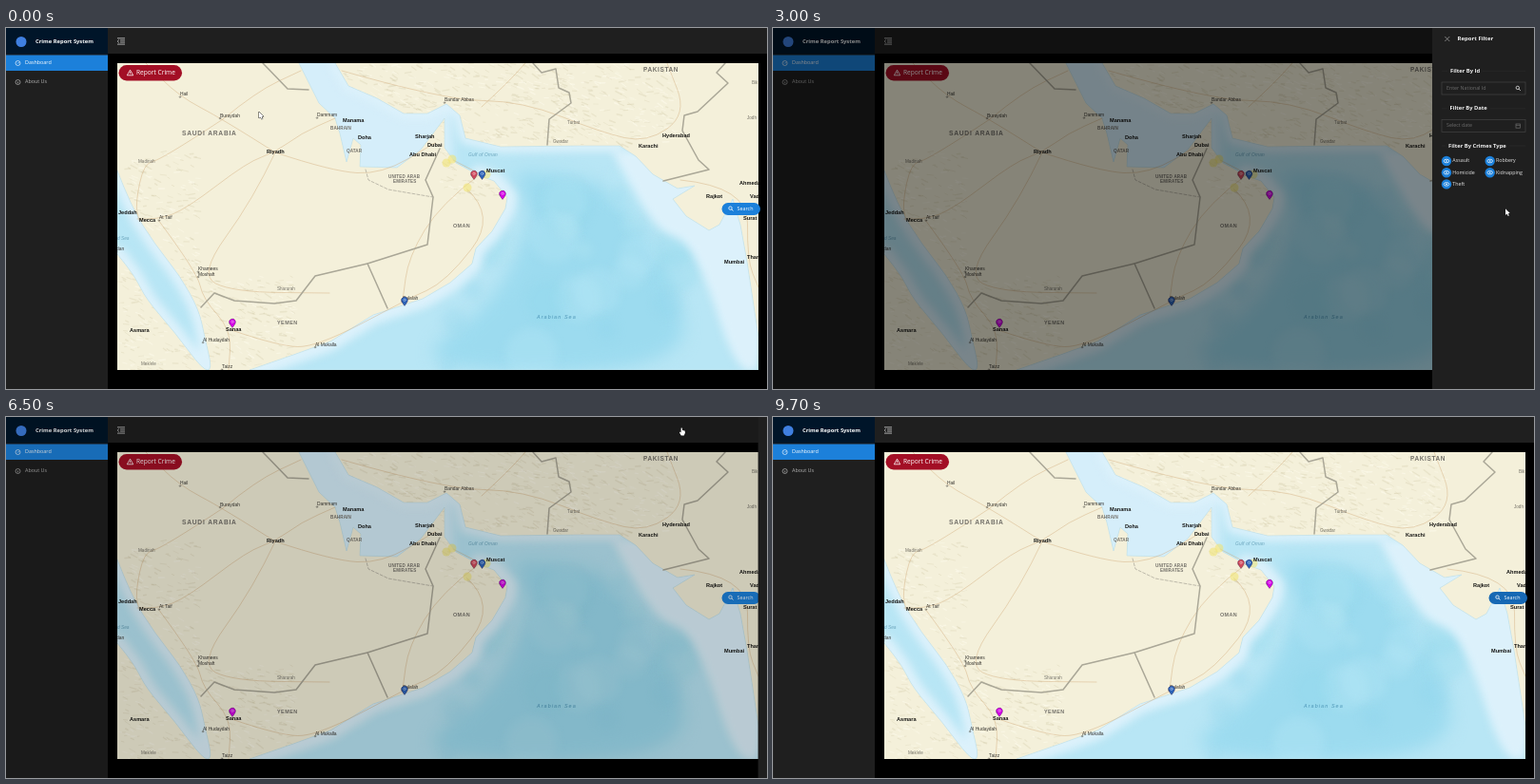
Recreate the animation shown at these times as an HTML page with a canvas. Size 800 px wide and 380 px high, loop 9.8 s.

```html
<!DOCTYPE html>
<html lang="en">
<head>
<meta charset="utf-8">
<title>Crime Report System</title>
<style>
  html, body { margin: 0; width: 100%; height: 100%; overflow: hidden; background: #000; }
  canvas { display: block; width: 800px; height: 380px; }
</style>
</head>
<body>
<canvas id="stage" width="800" height="380"></canvas>
<script>
const W = 800, H = 380, LOOP = 9800;
const MAP = { x: 117, y: 37, w: 674, h: 323 };
const DRAWER_W = 107, SLIDE = 300, MASK = 0.45;
const UI = '"Open Sans", "Noto Sans", sans-serif';
const SANS = '"Liberation Sans", Arial, sans-serif';
const ctx = document.getElementById('stage').getContext('2d');

// ---------- helpers ----------
function seeded(seed) {
  return () => (seed = (seed * 16807) % 2147483647) / 2147483647;
}

function text(c, str, x, y, size, color, opt = {}) {
  c.font = `${opt.style || ''} ${opt.weight || 400} ${size}px ${opt.family || UI}`;
  c.letterSpacing = (opt.spacing || 0) + 'px';
  c.textBaseline = 'middle';
  c.fillStyle = color;
  c.fillText(str, x, y);
  c.letterSpacing = '0px';
}

function trace(c, pts, smooth) {
  c.moveTo(...pts[0]);
  for (let i = 1; i < pts.length - 1; i++) {
    const [x, y] = pts[i], [nx, ny] = pts[i + 1];
    if (smooth) c.quadraticCurveTo(x, y, (x + nx) / 2, (y + ny) / 2);
    else c.lineTo(x, y);
  }
  c.lineTo(...pts[pts.length - 1]);
}

function line(c, pts, color, width, smooth = false) {
  c.beginPath();
  trace(c, pts, smooth);
  c.strokeStyle = color;
  c.lineWidth = width;
  c.stroke();
}

function rect(c, x, y, w, h, color) {
  c.fillStyle = color;
  c.fillRect(x, y, w, h);
}

function pill(x, y, w, h, color) {
  ctx.beginPath();
  ctx.roundRect(x, y, w, h, h / 2);
  ctx.fillStyle = color;
  ctx.fill();
}

function disc(c, x, y, r, color) {
  c.beginPath();
  c.arc(x, y, r, 0, 7);
  c.fillStyle = color;
  c.fill();
}

function ring(c, x, y, r, color, width = 0.7) {
  c.beginPath();
  c.arc(x, y, r, 0, 7);
  c.strokeStyle = color;
  c.lineWidth = width;
  c.stroke();
}

// ---------- map geometry ----------
const iranCoast = [[346, 37], [360, 61], [390, 74], [418, 90], [443, 90], [463, 80], [477, 92],
  [483, 116], [520, 125], [600, 124], [645, 124]];
const indiaCoast = [[662, 135], [680, 154], [706, 169], [724, 166], [701, 180], [715, 198],
  [739, 213], [750, 207], [764, 180], [772, 207], [779, 246], [791, 325]];
const southCoast = [[256, 360], [302, 344], [341, 330], [386, 302], [438, 285], [467, 268],
  [490, 248], [494, 232], [511, 214], [525, 190], [527, 178], [513, 161], [497, 155]];
const gulfCoast = [[473, 142], [461, 126], [461, 95], [436, 128], [411, 147], [372, 146],
  [373, 123], [365, 116], [358, 141], [351, 111], [346, 95], [329, 79], [308, 37]];
const redSea = [[117, 150], [132, 189], [156, 227], [183, 261], [203, 297], [209, 326], [217, 360],
  [207, 360], [178, 321], [147, 285], [136, 262], [117, 238]];
const ocean = iranCoast.concat(indiaCoast, [[791, 360]], southCoast, gulfCoast);
const indiaShelf = [[636, 128], [665, 182], [690, 216], [715, 224], [735, 262], [768, 362], [800, 362], [790, 130]];
const abyss = [[535, 152], [630, 150], [690, 240], [730, 362], [410, 362], [515, 290], [552, 200]];

const borders = [
  [[205, 294], [219, 279], [240, 287], [282, 290], [305, 287], [325, 261], [380, 248], [443, 228],
    [449, 178], [441, 160], [456, 127]],
  [[380, 248], [401, 295]],
  [[554, 37], [563, 47], [578, 43], [581, 63], [592, 68], [594, 79], [571, 96], [569, 123]],
  [[756, 37], [747, 47], [759, 58], [727, 88], [713, 92], [711, 108], [728, 139], [739, 149], [691, 161]],
  [[270, 37], [296, 64], [318, 65]]
];
const westRoads = [
  [[138, 201], [160, 202], [190, 190], [254, 141], [283, 131], [310, 111], [346, 95]],
  [[283, 131], [228, 96], [182, 72], [147, 37]],
  [[228, 96], [163, 139], [145, 142], [136, 185], [140, 203]],
  [[160, 202], [201, 257], [207, 285], [237, 318], [234, 360]],
  [[283, 131], [343, 151], [395, 154], [451, 121]],
  [[283, 131], [260, 180], [202, 260], [239, 278], [340, 279]],
  [[228, 96], [263, 67], [310, 45]]
];
const eastRoads = [
  [[497, 155], [457, 185], [423, 241], [417, 287]],
  [[484, 169], [516, 198], [463, 267], [421, 286]],
  [[237, 318], [287, 335], [326, 336], [418, 288]],
  [[353, 45], [461, 76], [543, 77], [626, 110], [674, 121], [716, 91], [695, 37]],
  [[500, 83], [525, 60], [546, 37]],
  [[709, 160], [780, 167], [779, 244], [791, 273]],
  [[470, 139], [499, 154]]
];

const cities = [
  ['Manama', 354, 97], ['Doha', 370, 115.5], ['Riyadh', 274, 130], ['Sharjah', 430, 114],
  ['Dubai', 443, 123.5], ['Abu Dhabi', 424, 133], ['Muscat', 505, 150.5], ['Jeddah', 118, 194],
  ['Mecca', 140, 202], ['Karachi', 665, 124.5], ['Hyderabad', 690, 113.5], ['Rajkot', 736, 177],
  ['Ahmeda', 771, 163], ['Surat', 775, 200], ['Mumbai', 755, 246], ['Sanaa', 231, 317.5],
  ['Asmara', 130, 318], ['Vad', 782, 177], ['Than', 779, 241]
];
const towns = [
  ['Hail', 183, 70], ['Buraydah', 225, 92.5], ['Dammam', 327, 92], ['Bandar Abbas', 461, 76],
  ['At Taif', 161, 200], ['Khamees', 202, 254], ['Moshaft', 202, 259.5], ['Al Hudaydah', 207, 328.5],
  ['Al Mukalla', 325, 333.5], ['Taizz', 227, 357], ['Salalah', 417, 285], ['dan', 116, 233]
];
const faintTowns = [
  ['Madinah', 139, 141], ['Sharurah', 285, 275], ['Turbat', 590, 100], ['Gwadar', 575, 120],
  ["Mek'ele", 142, 354], ['Jodh', 779, 95], ['Bik', 784, 58]
];
// label, x, y, size, spacing
const countries = [
  ['SAUDI ARABIA', 185, 111, 6.7, 0.75], ['PAKISTAN', 670, 44.5, 6.5, 0.6], ['OMAN', 470, 209, 5.4, 0.4],
  ['YEMEN', 285, 310.5, 5.4, 0.5], ['UNITED ARAB', 402, 157, 4.5, 0.2], ['EMIRATES', 407, 162, 4.5, 0.2],
  ['QATAR', 358, 129.5, 4.6, 0.1], ['BAHRAIN', 341, 106, 4.6, 0.1]
];
// x, y, width, height
const hills = [[355, 37, 240, 85], [125, 130, 75, 130], [200, 260, 100, 95], [117, 250, 80, 110],
  [575, 37, 130, 86], [455, 105, 70, 75]];

function drawRelief(c) {
  const rnd = seeded(77);
  for (const [x, y, w, h] of hills) {
    for (let i = 0; i < w * h / 45; i++) {
      const px = x + rnd() * w, py = y + rnd() * h, len = 2 + rnd() * 5;
      line(c, [[px, py], [px + len, py + len * (rnd() - 0.2)]],
        rnd() < 0.6 ? 'rgba(190,180,140,.2)' : 'rgba(255,253,240,.45)', 0.6 + rnd());
    }
  }
}

function drawSea(c) {
  const shallow = '#dcf1fb';
  const sea = new Path2D();
  trace(sea, ocean);
  sea.closePath();
  trace(sea, redSea, true);
  sea.closePath();
  const blurred = (pts, color, blur) => {
    c.filter = `blur(${blur}px)`;
    c.beginPath();
    trace(c, pts, true);
    c.closePath();
    c.fillStyle = color;
    c.fill();
  };
  c.save();
  c.clip(sea);
  rect(c, MAP.x, MAP.y, MAP.w, MAP.h, '#b8e6f5');
  blurred(abyss, '#9cdbef', 9);
  const rnd = seeded(913);
  for (let i = 0; i < 26; i++) {
    c.filter = 'blur(5px)';
    disc(c, 440 + rnd() * 270, 170 + rnd() * 190, 8 + rnd() * 20,
      rnd() < 0.5 ? 'rgba(140,213,236,.25)' : 'rgba(188,232,246,.28)');
  }
  blurred(indiaShelf, shallow, 4);
  c.filter = 'blur(6px)';
  rect(c, 290, 20, 180, 135, '#d5eefa');
  c.filter = 'blur(4px)';
  line(c, southCoast, shallow, 20);
  line(c, iranCoast, shallow, 12);
  line(c, redSea, shallow, 17, true);
  c.restore();
  c.strokeStyle = '#c3dfe5';
  c.lineWidth = 0.6;
  c.stroke(sea);
}

function drawPin(c, x, y, color) {
  c.beginPath();
  c.arc(x, y - 0.5, 3.4, Math.PI * 0.86, Math.PI * 0.14);
  c.quadraticCurveTo(x + 2, y + 3, x, y + 5.5);
  c.quadraticCurveTo(x - 2, y + 3, x - 3.1, y + 0.9);
  c.closePath();
  c.fillStyle = color;
  c.fill();
  c.strokeStyle = 'rgba(40,20,60,.55)';
  c.lineWidth = 0.6;
  c.stroke();
  ring(c, x, y - 0.7, 1.2, 'rgba(255,255,255,.65)', 0.6);
}

function buildMap() {
  const canvas = document.createElement('canvas');
  canvas.width = W;
  canvas.height = H;
  const c = canvas.getContext('2d');
  c.beginPath();
  c.rect(MAP.x, MAP.y, MAP.w, MAP.h);
  c.clip();
  c.lineJoin = c.lineCap = 'round';
  rect(c, MAP.x, MAP.y, MAP.w, MAP.h, '#f4f0da');
  drawRelief(c);
  drawSea(c);
  for (const r of westRoads.concat(eastRoads)) line(c, r, 'rgba(208,170,120,.62)', 0.7, true);
  for (const b of borders) line(c, b, '#aaa797', 1.5);
  c.setLineDash([3, 2]);
  line(c, [[378, 149], [381, 160], [402, 170], [449, 178]], '#b0ad9f', 0.8);
  c.setLineDash([]);

  for (const [x, y] of [[463, 142], [469, 138], [485, 168], [505, 154]])
    disc(c, x, y, 4.5, 'rgba(240,228,110,.55)');

  for (const [s, x, y, size, spacing] of countries)
    text(c, s, x, y, size, '#74716a', { family: SANS, weight: 700, spacing });
  for (const [s, x, y] of faintTowns) text(c, s, x, y, 4.6, '#77746a', { family: SANS });
  for (const [s, x, y] of towns) {
    ring(c, x, y + 2.6, 0.8, '#55524a', 0.5);
    text(c, s, x, y, 4.9, '#35332e', { family: SANS });
  }
  for (const [s, x, y] of cities) text(c, s, x, y, 5.6, '#151513', { family: SANS, weight: 700 });
  const sea = { family: SANS, style: 'italic' };
  text(c, 'Arabian Sea', 558, 304, 5.4, '#4b94b5', { ...sea, spacing: 1.1 });
  text(c, 'Gulf of Oman', 486, 133.5, 4.8, '#6ba5bd', { ...sea, spacing: 0.2 });
  text(c, 'd Sea', 117, 222, 4.8, '#6ba5bd', sea);

  drawPin(c, 492, 154, '#d04a5c');
  drawPin(c, 500.5, 154, '#2a62b8');
  drawPin(c, 522, 175, '#d400e6');
  drawPin(c, 419, 287, '#2a62b8');
  drawPin(c, 238, 310, '#d400e6');
  return canvas;
}
const mapLayer = buildMap();

// ---------- interface ----------
function magnifier(x, y, color) {
  ring(ctx, x, y, 1.7, color, 0.8);
  line(ctx, [[x + 1.2, y + 1.2], [x + 2.9, y + 2.9]], color, 0.9);
}

function drawShell(hover) {
  rect(ctx, 0, 0, W, H, '#000');
  rect(ctx, 107, 0, 693, 27, '#1f1f1f');
  rect(ctx, 0, 0, 107, H, '#1f1f1f');
  rect(ctx, 0, 0, 107, 27.5, '#001529');
  disc(ctx, 16, 14.5, 5.5, '#3f7fe0');
  text(ctx, 'Crime Report System', 31, 14.3, 5.8, '#fff', { weight: 700 });

  rect(ctx, 0, 28.5, 107, 16.5, '#1c80da');
  ring(ctx, 12.5, 37, 2.5, '#e8f2fc');
  line(ctx, [[12.5, 37.4], [13.6, 35.9]], '#e8f2fc', 0.7);
  text(ctx, 'Dashboard', 20, 37, 5.4, '#fff');
  ring(ctx, 12.5, 57, 2.5, '#b5b5b5');
  line(ctx, [[12.5, 56.4], [12.5, 58.4]], '#b5b5b5', 0.7);
  text(ctx, 'About Us', 20, 57, 5.4, '#b5b5b5');

  for (let i = 0; i < 4; i++) {
    const y = 10.8 + i * 2.1;
    line(ctx, [[i % 3 ? 120 : 117, y], [125, y]], '#d0d0d0', 0.8);
  }
  line(ctx, [[118.8, 12.5], [117.2, 14], [118.8, 15.5]], '#d0d0d0', 0.8);

  ctx.drawImage(mapLayer, 0, 0);
  pill(118.5, 39, 66.5, 16.5, '#a30f25');
  line(ctx, [[130.5, 44.2], [127.3, 49.8], [133.7, 49.8], [130.5, 44.2]], '#fff', 0.8);
  line(ctx, [[130.5, 46.2], [130.5, 48.3]], '#fff', 0.7);
  text(ctx, 'Report Crime', 137, 47.5, 6.6, '#fff');

  pill(752.5, 184, 40.5, 13, hover ? '#1668b4' : '#1c80da');
  magnifier(761.5, 189.6, '#fff');
  text(ctx, 'Search', 768.5, 190.5, 5.4, '#fff');
}

function divider(label, x, y) {
  line(ctx, [[10, y], [x - 3, y]], '#2d2d2d', 0.6);
  text(ctx, label, x, y, 5.8, '#f2f2f2', { weight: 700 });
  const end = x + ctx.measureText(label).width + 3;
  if (end < 98) line(ctx, [[end, y], [98, y]], '#2d2d2d', 0.6);
}

function field(label, y) {
  ctx.strokeStyle = '#424242';
  ctx.lineWidth = 0.7;
  ctx.strokeRect(10, y - 6.5, 88, 13);
  text(ctx, label, 15, y, 5.3, '#6c6c6c');
}

function toggle(label, x, y) {
  disc(ctx, x, y, 5.2, '#1c80da');
  ctx.beginPath();
  ctx.ellipse(x, y, 2.8, 1.8, 0, 0, 7);
  ctx.strokeStyle = '#fff';
  ctx.lineWidth = 0.7;
  ctx.stroke();
  disc(ctx, x, y, 0.8, '#fff');
  text(ctx, label, x + 6.3, y, 5.3, '#e4e4e4');
}

function drawDrawer(x) {
  ctx.save();
  ctx.translate(x, 0);
  rect(ctx, 0, 0, DRAWER_W, H, '#1f1f1f');
  line(ctx, [[13.3, 9], [18.3, 14]], '#a8a8a8', 0.7);
  line(ctx, [[18.3, 9], [13.3, 14]], '#a8a8a8', 0.7);
  text(ctx, 'Report Filter', 26.5, 11.8, 6, '#f2f2f2', { weight: 700 });
  divider('Filter By Id', 19, 45.3);
  field('Enter National Id', 63.5);
  magnifier(89.8, 62.9, '#e0e0e0');
  divider('Filter By Date', 18.5, 84.8);
  field('Select date', 103);
  ctx.strokeStyle = '#6c6c6c';
  ctx.strokeRect(88, 101, 4.6, 4.2);
  line(ctx, [[88, 102.5], [92.6, 102.5]], '#6c6c6c', 0.6);
  divider('Filter By Crimes Type', 17, 124);
  ['Assault', 'Robbery', 'Homicide', 'Kidnapping', 'Theft'].forEach((label, i) =>
    toggle(label, i % 2 ? 60.7 : 15, 140 + Math.floor(i / 2) * 12.2));
  ctx.restore();
}

const handShape = [[-1.4, -3.5], [-0.2, -3.5], [0, -1], [2.6, -0.4], [3, 1.5], [1.8, 4.6], [-1.2, 4.6],
  [-3, 1.6], [-2.6, 0.6], [-1.4, 1.4]];
const arrowShape = [[-1, -3.8], [-1, 3], [0.6, 1.6], [1.7, 4], [2.8, 3.5], [1.8, 1.2], [3.8, 1.1]];

function drawCursor(x, y, hand) {
  ctx.save();
  ctx.translate(x, y);
  ctx.beginPath();
  trace(ctx, hand ? handShape : arrowShape);
  ctx.closePath();
  ctx.fillStyle = '#fff';
  ctx.strokeStyle = '#111';
  ctx.lineWidth = 0.9;
  ctx.stroke();
  ctx.fill();
  ctx.restore();
}

// ---------- motion ----------
// time, x, y
const pointerPath = [[0, 267, 92], [500, 267, 92], [2200, 771, 194], [3100, 771, 194], [3900, 772, 113],
  [4500, 772, 113], [5900, 711, 15], [6550, 711, 15], [7150, 773, 194], [7550, 773, 194],
  [8080, 640, 183], [8500, 640, 183], [9100, 780, 191], [LOOP, 780, 191]];
const POINTER_GONE = 9200;
const slides = [[2655, true], [6308, false], [7280, true], [8200, false]];

const clamp = v => Math.min(1, Math.max(0, v));

// cubic-bezier(.25, .1, .25, 1)
function ease(p) {
  let lo = 0, hi = 1;
  const curve = (s, a, b) => 3 * (1 - s) ** 2 * s * a + 3 * (1 - s) * s * s * b + s ** 3;
  for (let i = 0; i < 20; i++) {
    const mid = (lo + hi) / 2;
    if (curve(mid, 0.25, 0.25) < p) lo = mid; else hi = mid;
  }
  return curve(lo, 0.1, 1);
}

function drawerState(t) {
  let shown = 0, shade = 0;
  for (const [start, opening] of slides) {
    if (t < start) break;
    const p = clamp((t - start) / SLIDE);
    shown = opening ? ease(p) : 1 - ease(p);
    shade = opening ? p : 1 - p;
  }
  return { shown, shade };
}

function pointerAt(t) {
  const i = pointerPath.findIndex(p => p[0] > t);
  const [t0, x0, y0] = pointerPath[i - 1], [t1, x1, y1] = pointerPath[i];
  const p = (t - t0) / (t1 - t0), s = p * p * (3 - 2 * p);
  return [x0 + (x1 - x0) * s, y0 + (y1 - y0) * s];
}

function render(t) {
  const { shown, shade } = drawerState(t);
  const [x, y] = pointerAt(t);
  const overSearch = x > 752 && y > 182 && y < 198 && shade < 0.5;
  const overClose = shown > 0 && Math.hypot(x - 711, y - 15) < 7;
  drawShell(overSearch);
  if (shade > 0) rect(ctx, 0, 0, W, H, `rgba(0,0,0,${MASK * shade})`);
  if (shown > 0.001) drawDrawer(W - DRAWER_W * shown);
  if (t < POINTER_GONE) drawCursor(x, y, overSearch || overClose);
}

function frame() {
  render(performance.now() % LOOP);
  requestAnimationFrame(frame);
}
frame();
</script>
</body>
</html>
```
